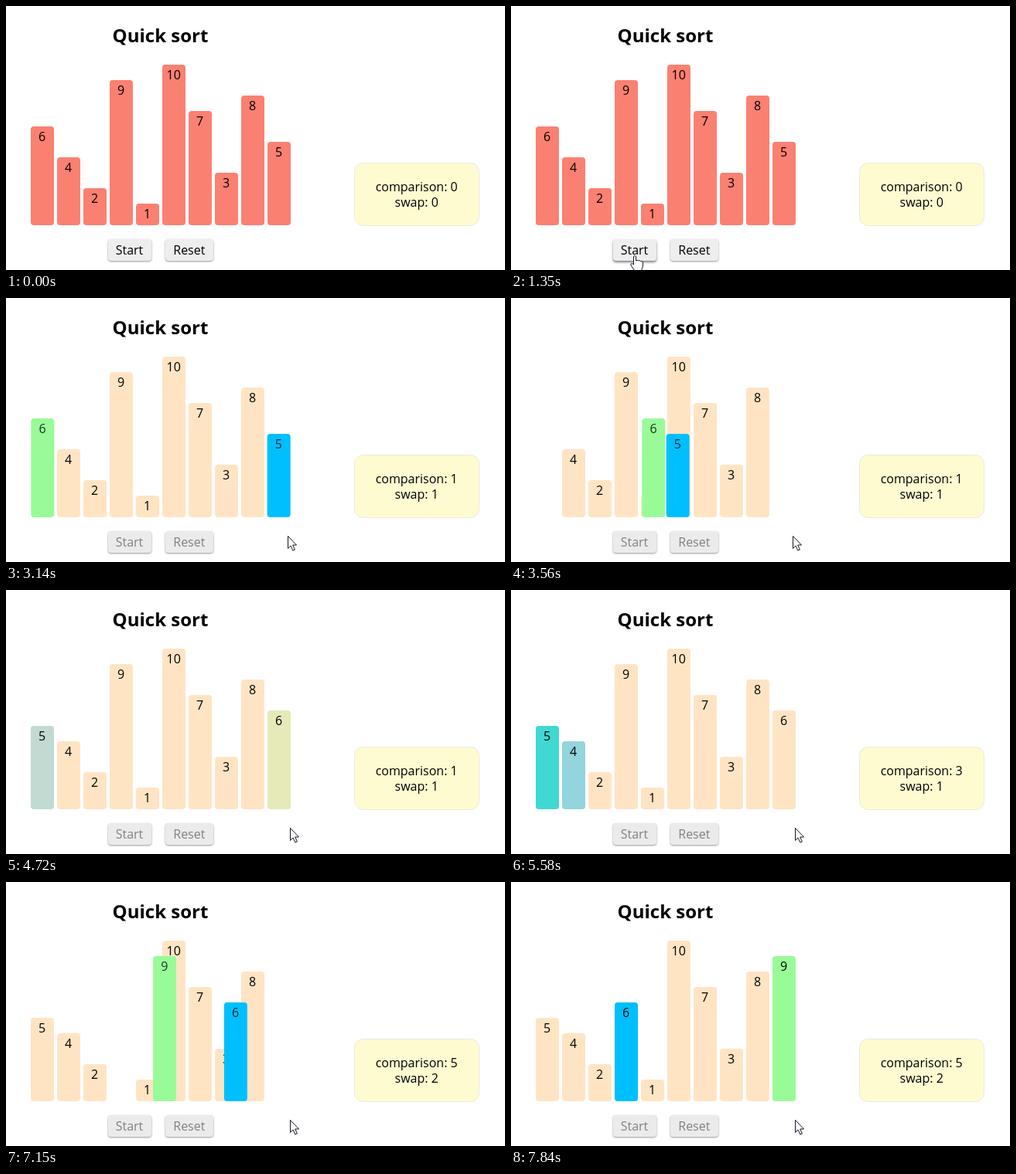
Write an HTML page that moves like this. It is 645 px wide and 342 px high and loops after 8 s.

```html
<!DOCTYPE html>
<html lang="en">
<head>
<meta charset="utf-8">
<title>Quick sort</title>
<style>
  html, body { margin: 0; width: 100%; height: 100%; overflow: hidden; background: #fff; }
  svg { display: block; width: 645px; height: 342px; }
  text { font: 16px "Open Sans", "Noto Sans", sans-serif; text-anchor: middle; }
  .title { font-size: 24px; font-weight: bold; }
  .panel { fill: #fffbd1; stroke: #ebe9dc; }
  .button rect { fill: #eee; filter: drop-shadow(0 1px 1px rgba(0, 0, 0, .42)); }
  .button.hover rect { filter: drop-shadow(0 2px 1.5px rgba(0, 0, 0, .5)); }
  .disabled text { fill: #808080; }
  .disabled rect { fill: #ebebeb; }
  .moving text { fill-opacity: .8; }
  #cursor > * { display: none; }
  #cursor.arrow .arrow, #cursor.hand .hand, #cursor.blocked .blocked { display: inline; }
  .arrow, .hand { fill: #fff; stroke: #151525; stroke-width: 1; stroke-linejoin: round; }
  .blocked { fill: rgba(255, 255, 255, .55); stroke: #bd1525; stroke-width: 2.4; }
</style>
</head>
<body>
<svg viewBox="0 0 645 342">
  <text class="title" x="199.5" y="47">Quick sort</text>
  <g id="bars"></g>
  <g id="buttons">
    <g class="button" id="start">
      <rect x="132" y="302" width="56" height="28" rx="4"/>
      <text x="159.5" y="322">Start</text>
    </g>
    <g class="button">
      <rect x="206" y="302" width="62" height="28" rx="4"/>
      <text x="236.8" y="322">Reset</text>
    </g>
  </g>
  <rect class="panel" x="450.5" y="203.5" width="161" height="81" rx="11"/>
  <text id="comparison" x="530.7" y="240"></text>
  <text id="swap" x="530.7" y="260"></text>
  <g id="cursor">
    <path class="arrow" d="M.5 .5V16.5L4 13L6.8 19L9.4 18L6.7 12H11.5Z"/>
    <path class="hand" d="M-1.5 11V2.5Q0 .5 1.5 2.5V8Q3 6.5 4.5 8Q6 7 7.5 8.6Q9.5 8 10.5 10V15L8.5 21H0L-5 14Q-5.5 11.5-3.5 11.5L-1.5 13Z"/>
    <path class="blocked" d="M-7 0A7 7 0 1 1 7 0A7 7 0 1 1-7 0ZM-4.9-4.9L4.9 4.9"/>
  </g>
</svg>
<script>
const LOOP = 8000, FADE = 300, SLIDE = 938;
const SALMON = [250, 128, 114], BISQUE = [255, 228, 196];
const GREEN = [152, 251, 152], BLUE = [0, 191, 255];
const DISABLED_AT = 1830;

const values = [6, 4, 2, 9, 1, 10, 7, 3, 8, 5];
const paintOrder = [1, 2, 3, 4, 7, 8, 10, 9, 6, 5];

// Each entry: time, then [value, colour] pairs that start fading.
const paints = [
  [DISABLED_AT, ...values.map(v => [v, BISQUE])],
  [2513, [6, GREEN], [5, BLUE]],
  [4583, [6, BISQUE], [5, BISQUE]],
  [5023, [5, BLUE]],
  [5503, [5, GREEN], [4, BLUE]],
  [5963, [4, BISQUE], [2, BLUE]],
  [6423, [2, BISQUE], [5, BISQUE], [9, GREEN], [6, BLUE]],
];
// Time and the two values trading places.
const swaps = [[3139, 6, 5], [6892, 9, 6]];
const comparisonTimes = [2520, 5030, 5510, 5970, 6430];
const swapTimes = [2520, 6430];
const cursorPath = [
  [1190, 158, 340], [1350, 160, 322], [2660, 160, 322],
  [2980, 364, 308], [3600, 364, 308], [3720, 367, 308],
];

const $ = id => document.getElementById(id);
const clamp = x => Math.min(1, Math.max(0, x));
const mix = (a, b, p) => a + (b - a) * p;
const countUntil = (times, t) => times.filter(time => time <= t).length;

// CSS "ease": cubic-bezier(.25, .1, .25, 1)
function ease(x) {
  const curve = (a, b, s) => 3 * a * s * (1 - s) ** 2 + 3 * b * s * s * (1 - s) + s ** 3;
  let low = 0, high = 1;
  for (let i = 0; i < 20; i++) {
    const mid = (low + high) / 2;
    if (curve(.25, .25, mid) < x) low = mid; else high = mid;
  }
  return curve(.1, 1, low);
}

const bars = new Map(paintOrder.map(value => {
  const top = 276 - 20 * value;
  const group = document.createElementNS("http://www.w3.org/2000/svg", "g");
  group.innerHTML = `<rect y="${top}" width="30" height="${284 - top}" rx="4"/>
    <text x="14.7" y="${top + 19}">${value}</text>`;
  $("bars").append(group);
  return [value, group];
}));

function drawBars(t) {
  const colors = new Map(values.map(v => [v, SALMON]));
  for (const [time, ...changes] of paints) {
    if (t < time) break;
    const p = ease(clamp((t - time) / FADE));
    for (const [value, color] of changes) {
      colors.set(value, colors.get(value).map((c, i) => mix(c, color[i], p)));
    }
  }

  const slots = new Map(values.map((v, i) => [v, i]));
  const moving = new Set();
  for (const [time, a, b] of swaps) {
    const p = clamp((t - time) / SLIDE);
    const from = slots.get(a), to = slots.get(b);
    slots.set(a, mix(from, to, p));
    slots.set(b, mix(to, from, p));
    if (p > 0 && p < 1) moving.add(a).add(b);
  }

  for (const [value, group] of bars) {
    group.setAttribute("transform", `translate(${32 + 34 * slots.get(value)} 0)`);
    group.setAttribute("class", moving.has(value) ? "moving" : "");
    group.firstChild.setAttribute("fill", `rgb(${colors.get(value).map(Math.round)})`);
  }
}

function cursorAt(t) {
  const next = cursorPath.findIndex(([time]) => time > t);
  if (next < 0) return cursorPath.at(-1).slice(1);
  const [t0, x0, y0] = cursorPath[next - 1], [t1, x1, y1] = cursorPath[next];
  const p = (t - t0) / (t1 - t0);
  return [mix(x0, x1, p), mix(y0, y1, p)];
}

function drawControls(t) {
  const disabled = t >= DISABLED_AT;
  $("buttons").setAttribute("class", disabled ? "disabled" : "");
  let kind = "", hover = false;
  if (t >= cursorPath[0][0]) {
    const [x, y] = cursorAt(t);
    const inRow = y > 302 && y < 331;
    hover = inRow && x > 132 && x < 188;
    const overButton = hover || (inRow && x > 206 && x < 268);
    kind = !overButton ? "arrow" : disabled ? "blocked" : "hand";
    $("cursor").setAttribute("transform", `translate(${x} ${y})`);
  }
  $("cursor").setAttribute("class", kind);
  $("start").setAttribute("class", hover ? "button hover" : "button");
}

function draw(t) {
  drawBars(t);
  drawControls(t);
  $("comparison").textContent = `comparison: ${countUntil(comparisonTimes, t)}`;
  $("swap").textContent = `swap: ${countUntil(swapTimes, t)}`;
}

let begin;
function tick(now) {
  begin ??= now;
  draw((now - begin) % LOOP);
  requestAnimationFrame(tick);
}
draw(0);
requestAnimationFrame(tick);
</script>
</body>
</html>
```
